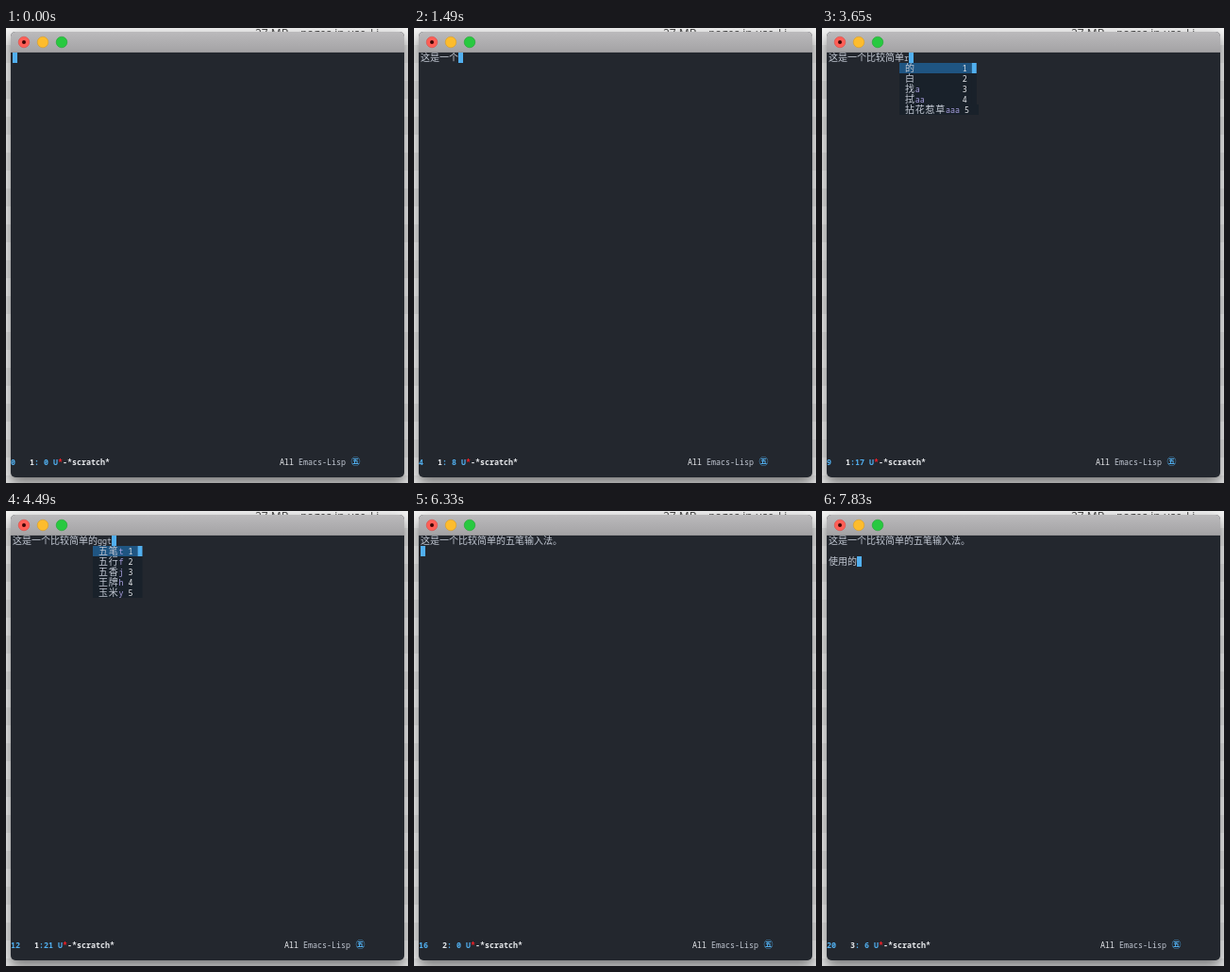
Recreate the animation shown at these times as an HTML page. Size 426 px wide and 482 px high, loop 8000 ms.

```html
<!DOCTYPE html>
<html lang="zh">
<head>
<meta charset="utf-8">
<title>Typing in an editor</title>
<style>
  html, body { margin: 0; width: 100%; height: 100%; overflow: hidden; background: #f4f4f4; }
  svg { display: block; width: 426px; height: 482px; }
  .mono { font: 8.333px "Noto Sans Mono", "DejaVu Sans Mono", monospace; }
  .han { font: 500 10px "Noto Sans CJK SC", "Noto Sans CJK", "Noto Sans CJK JP", sans-serif; }
  .wide { letter-spacing: .75px; }
  .bold { font-weight: 700; }
  .behind { font: 12px "Open Sans", sans-serif; fill: #444; }
  .window { filter: drop-shadow(0 6px 7px rgba(0, 0, 0, .5)); }
</style>
</head>
<body>
<svg viewBox="0 0 426 482">
  <defs>
    <linearGradient id="bar" x2="0" y2="1">
      <stop stop-color="#bbbabc"/><stop offset="1" stop-color="#a3a2a4"/>
    </linearGradient>
    <pattern id="stripes" width="426" height="38" patternUnits="userSpaceOnUse">
      <path d="M0 18h426v19H0z" fill="#e6e6e6"/>
    </pattern>
  </defs>
  <path d="M0 0h426v482H0z" fill="#f4f4f4"/>
  <path d="M0 0h426v482H0z" fill="url(#stripes)"/>
  <g class="behind">
    <text x="264" y="10">27 MB</text>
    <text x="312" y="10">pages in use</text>
    <text x="386" y="10">Li</text>
  </g>
  <rect class="window" x="5" y="4" width="417" height="472" rx="5" fill="#23272e"/>
  <path d="M5 26V9a5 5 0 0 1 5-5h407a5 5 0 0 1 5 5v17z" fill="url(#bar)"/>
  <path d="M5 25.5h417" stroke="#8e8d90" stroke-width=".6"/>
  <g stroke-width=".6">
    <circle cx="19" cy="15" r="5.8" fill="#ff5f57" stroke="#dc4843"/>
    <circle cx="39" cy="15" r="5.8" fill="#fdbc2d" stroke="#d99c25"/>
    <circle cx="59" cy="15" r="5.8" fill="#28c940" stroke="#1fa432"/>
  </g>
  <circle cx="19" cy="15" r="2" fill="#3d0503"/>
  <g id="screen"></g>
</svg>
<script>
const LOOP = 8000, LEFT = 7, TOP = 26, ROW = 11, CELL = 5, DRIFT = .75;
const FG = '#c3c9d4', BRIGHT = '#e8eaed', BLUE = '#51afef', VIOLET = '#a9a1e1';
const POPUP = '#19212a', SELECTED = '#1f5582', RED = '#ff1f26';

// Candidates per input code; trailing letters are the keys still to type.
const WORDS = {
  p: '这 宀 寒a 宽aa 赛aaa',
  j: '是 日 时a 暮aa 晶体aaa',
  g: '一 王 开a 戒aa 开工aa',
  gg: '五 王gg 五笔tt 五行tf 五香tj',
  ggt: '五笔t 五行f 五香j 王牌h 玉米y',
  ggtt: '五笔 环行gg',
  w: '人 八 代a 伐aa 公式aaa',
  wh: '个 仆y 侦mm 企业og 仰止hh',
  x: '经 纟 红a 绒aa 纲举目张aaa',
  xx: '比 丝 弱u 比较lu 毕xf',
  xxl: '比较u 比丝x 弱力t 丝国g 比黑f',
  xxlu: '比较',
  t: '和 禾 长a 季aa 牧草aaa',
  tu: '科 生产工艺aa 冬节ab 冬藏ad 科斯ad',
  tuu: '冬 简单j 冬装f 科头d 税率y',
  tuuj: '简单',
  r: '的 白 找a 拭aa 拈花惹草aaa',
  l: '国 田 轻a 罢aa 轻工业aaa',
  lt: '图 冈a 连生aa 输入ty 轮辐gk',
  lti: '输入法f',
  ltif: '输入法',
  wg: '伍 会aa 使用et 人工费xj 全球gf',
  wge: '使用t 全胜t 仁爱p 会服b 合肥c',
  wget: '使用'
};

const LINE = '这是一个比较简单的五笔输入法。';
// [time, committed length, code being typed, popup still pending]
const STEPS = [
  [0, 0, ''],
  [600, 0, 'p', 1], [660, 0, 'p'], [780, 1, ''], [840, 1, 'j'], [900, 2, ''],
  [1130, 2, 'g', 1], [1190, 2, 'g'], [1250, 3, ''], [1310, 3, 'w'], [1370, 3, 'wh'], [1490, 4, ''],
  [1730, 4, 'x'], [1850, 4, 'xx'], [1910, 4, 'xxl'], [2030, 4, 'xxlu'],
  [2690, 6, ''], [2750, 6, 't'], [2860, 6, 'tu'], [2970, 6, 'tuu'], [3210, 6, 'tuuj'], [3440, 8, ''],
  [3590, 8, 'r', 1], [3650, 8, 'r'], [3770, 9, ''],
  [3950, 9, 'g'], [4130, 9, 'gg'], [4490, 9, 'ggt'], [4670, 9, 'ggtt'], [5270, 11, ''],
  [5500, 11, 'l'], [5560, 11, 'lt'], [5610, 11, 'lti'], [5850, 11, 'ltif'], [5970, 14, ''], [6030, 15, ''],
  [6330, 16, ''], [6450, 17, ''],
  [6690, 17, 'w', 1], [6750, 17, 'w'], [6810, 17, 'wg'], [7050, 17, 'wge'], [7110, 17, 'wget'], [7470, 19, ''],
  [7710, 19, 'r', 1], [7770, 19, 'r'], [7830, 20, '']
];
const FULL = LINE + '\n\n使用的';

const text = (s, x, y, fill, cls = 'mono') =>
  s && `<text x="${x}" y="${y}" fill="${fill}" class="${cls}">${s}</text>`;
const rect = (x, y, w, fill) =>
  `<rect x="${x}" y="${y}" width="${w}" height="${ROW}" fill="${fill}"/>`;

function popup(code, start, top) {
  const rows = WORDS[code].split(' ').map(w => {
    const keys = w.match(/[a-z]*$/)[0];
    return { han: w.slice(0, w.length - keys.length), keys };
  });
  const width = Math.max(...rows.map(r => r.han.length * 2 + r.keys.length)) * CELL;
  const left = Math.max(LEFT, start - CELL), x = start + 1;
  const scroll = rows.length > 4;
  return rows.map(({ han, keys }, i) => {
    const y = top + i * ROW, shift = han.length * DRIFT;
    const end = x + width + 3 * CELL + shift;
    const bar = scroll ? rect(end, y, CELL, i ? POPUP : BLUE) : '';
    return rect(left, y, end - left, i ? POPUP : SELECTED) + bar +
      text(han, x, y + 9.3, FG, 'han wide') +
      text(keys, x + han.length * 2 * CELL + shift, y + 9, VIOLET) +
      text(i + 1, x + width + CELL + shift, y + 9, BRIGHT);
  }).join('');
}

function modeLine(count, row, col) {
  const y = 463.3, n = String(count), shift = (n.length - 1) * CELL;
  const at = (s, x, fill, cls = 'mono bold') => text(s, x + shift, y, fill, cls);
  const c = String(col);
  return text(n, 5, y, BLUE, 'mono bold') +
    at(row, 25, BRIGHT) + at(':', 30, BLUE) + at(c, 45 - c.length * CELL, BLUE) +
    at('U', 50, BLUE) + at('*', 55, RED) + at('-', 60, BRIGHT) + at('*scratch*', 65, BRIGHT) +
    at('All', 290, BRIGHT, 'mono') + at('Emacs-Lisp', 310, FG, 'mono') +
    at('㊄', 365.5, BLUE, 'han bold');
}

function render([, length, code, pending]) {
  const typed = FULL.slice(0, length), lines = typed.split('\n');
  const last = lines.length - 1, top = TOP + last * ROW;
  const start = LEFT + lines[last].length * 2 * CELL;
  return lines.map((s, i) => text(s, LEFT, TOP + i * ROW + 9.3, FG, 'han')).join('') +
    text(code, start, top + 9, FG) +
    rect(start + code.length * CELL, top, CELL, BLUE) +
    (code && !pending ? popup(code, start, top + ROW) : '') +
    modeLine(length + code.length, last + 1, lines[last].length * 2 + code.length);
}

const screen = document.getElementById('screen');
let shown = null;
function tick() {
  const t = performance.now() % LOOP;
  const step = STEPS.findLast(s => s[0] <= t);
  if (step !== shown) screen.innerHTML = render(shown = step);
  requestAnimationFrame(tick);
}
tick();
</script>
</body>
</html>
```
